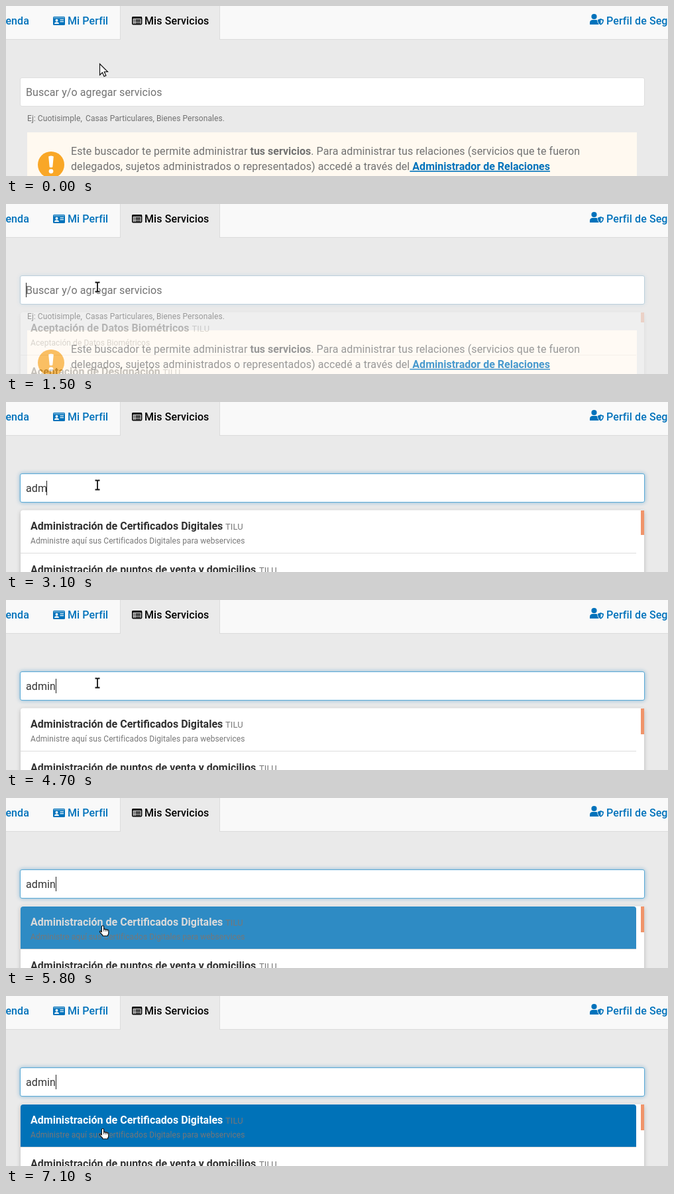
Recreate the animation shown at these times as an HTML page. Size 999 by 257 pixels, loop 8000 ms.

```html
<!DOCTYPE html>
<html lang="es">
<head>
<meta charset="utf-8">
<title>Mis Servicios</title>
<style>
html, body { margin: 0; width: 100%; height: 100%; overflow: hidden; background: #eaeaea; }
svg { display: block; font-family: Roboto, "Noto Sans", sans-serif; font-size: 16px; }
text { letter-spacing: .095px; }
.nav { font-weight: 500; fill: #0072bb; }
.blue { fill: #0072bb; }
.grey { fill: #717171; }
.small { font-size: 12px; letter-spacing: .07px; }
.org { font-size: 13px; fill: #777; }
.bold { font-weight: 700; letter-spacing: 0; }
.link { fill: #0072bb; text-decoration: underline; }
.typed { fill: #333; }
.glow { filter: drop-shadow(0 0 3px rgba(0,114,187,.45)); }
.panel { filter: drop-shadow(0 2px 3px rgba(0,0,0,.22)); }
</style>
</head>
<body>
<svg width="999" height="257" viewBox="0 0 999 257">
  <defs>
    <path id="bar-shape" d="M-3.5-7h2.5q1 0 1 1 0-1 1-1h2.5M0-6V6M-3.5 7h2.5q1 0 1-1 0 1 1 1h2.5"/>
  </defs>
  <rect width="999" height="257" fill="#eaeaea"/>
  <rect width="999" height="50" fill="#f9f9f9"/>
  <rect y="50" width="999" height="1" fill="#dcdcdc"/>
  <path d="M172 0h151v51H172z" fill="#dcdcdc"/>
  <path d="M173 0h149v51H173z" fill="#eaeaea"/>

  <g class="nav">
    <text x="35" y="28" text-anchor="end">enda</text>
    <text x="93" y="28">Mi Perfil</text>
    <text x="209" y="28" fill="#000">Mis Servicios</text>
    <text x="906" y="28">Perfil de Seguridad</text>
  </g>

  <!-- card icon -->
  <rect class="blue" x="71" y="16" width="18" height="13" rx="1.5"/>
  <g fill="#f9f9f9">
    <path d="M72 17.5h16v.8H72zM81.5 20.3h5.5v1.2h-5.5zM81.5 23h5.5v1.2h-5.5z"/>
    <circle cx="76.5" cy="21.8" r="2"/>
    <path d="M73 27q0-2.8 3.5-2.8t3.5 2.8z"/>
  </g>
  <!-- list icon -->
  <rect x="190.8" y="16.8" width="13.8" height="11" rx="1.2" fill="none" stroke="#000" stroke-width="1.6"/>
  <path d="M190.5 16.5h14.5v2.4h-14.5zM192.7 20.2h1.6v1.5h-1.6zM195.3 20.2h7.6v1.5h-7.6zM192.7 22.6h1.6v1.5h-1.6zM195.3 22.6h7.6v1.5h-7.6zM192.7 25h1.6v1.5h-1.6zM195.3 25h7.6v1.5h-7.6z"/>
  <!-- user icon -->
  <g class="blue">
    <circle cx="887.5" cy="16" r="4.1"/>
    <path d="M881 28v-2.5q0-4.5 4.5-4.5h5.5l1.2.4q0 4 2.6 6.6z"/>
    <path d="M897.5 19l4.5 1.7q.2 5.6-4.5 8-4.7-2.4-4.5-8z"/>
  </g>
  <path d="M897.5 20.9v6q2.9-1.7 2.9-5z" fill="#f9f9f9"/>

  <rect x="21.5" y="108.5" width="942" height="43" rx="2.5" fill="#fff" stroke="#dedede"/>
  <rect id="focus" class="glow" x="21.5" y="108.5" width="942" height="43" rx="2.5" fill="#fff" stroke="#5aaad6"/>
  <text id="hint" class="grey" x="30" y="136">Buscar y/o agregar servicios</text>
  <text id="typed" class="typed" x="30" y="136"></text>
  <rect id="caret" y="119" width="1" height="22" fill="#222"/>

  <text class="grey small" x="32" y="174">Ej: Cuotisimple, <tspan x="120">Casas Particulares, Bienes Personales.</tspan></text>
  <rect x="32" y="191" width="920" height="70" fill="#fff9f0"/>
  <circle cx="68" cy="240" r="20" fill="#f9a727"/>
  <path d="M64.2 227.5q3.8-2 7.6 0l-1.5 16q-2.3 1.6-4.6 0z" fill="#fff"/>
  <circle cx="68" cy="249.8" r="3.4" fill="#fff"/>
  <text class="grey" x="98" y="225">Este buscador te permite administrar <tspan class="bold">tus servicios</tspan>. Para administrar tus relaciones (servicios que te fueron</text>
  <text class="grey" x="98" y="248">delegados, sujetos administrados o representados) accedé a través del<tspan class="bold link"> Administrador de Relaciones</tspan></text>

  <g id="list">
    <rect class="panel" x="22" y="163.5" width="941" height="120" rx="4" fill="#fff"/>
    <path id="hover" d="M22 228V168q0-4 4-4h921q4 0 4 4v60z" fill="#0072b8"/>
    <rect x="22" y="228" width="929" height="1" fill="#dcdcdc"/>
    <rect id="bar" x="958" y="164" width="5" fill="#f0946a"/>
    <text id="t1" class="bold" x="37" y="193"></text>
    <text id="o1" class="org" y="193">TILU</text>
    <text id="sub" class="small" fill="#777" x="37" y="214"></text>
    <text id="t2" class="bold" x="37" y="259" fill="#333"></text>
    <text id="o2" class="org" y="259">TILU</text>
  </g>

  <g id="arrow" fill="#fff" stroke="#111" stroke-width="1.2">
    <path d="M.5.5v16.8l4-3.8 2.6 5.9 2.8-1.2-2.6-5.7h5.2z"/>
  </g>
  <g id="beam" fill="none">
    <use href="#bar-shape" stroke="#fff" stroke-width="3.6"/>
    <use href="#bar-shape" stroke="#111" stroke-width="1.8"/>
  </g>
  <g id="hand" fill="#fff" stroke="#111" stroke-width="1.2" stroke-linejoin="round">
    <path d="M-1.6 9.5V1.5Q-1.6 0 0 0T1.6 1.5V5.6q1.4-.9 2.6.2 1.6-.6 2.4.5 2.2-.3 2.2 1.6v3.6q0 1.6-1.2 2.6v1.4H-.2v-1.2q-1.8-1.6-4.4-5 .2-2.4 3 .2z"/>
    <path d="M1.6 5.6v3M4.2 5.8v3M6.6 6.3v2.5" stroke-width=".8"/>
  </g>
</svg>
<script>
const LOOP = 8000;
const $ = id => document.getElementById(id);

// Each table holds [time in ms, value]; a value lasts until the next row.
const pointer = [
  [0, ['arrow', 141, 87]], [200, ['arrow', 141, 89]], [300, ['arrow', 141, 94]],
  [400, ['arrow', 140, 101]], [500, ['beam', 138, 114]], [600, ['beam', 137, 123]],
  [700, ['beam', 138, 126.5]], [900, ['beam', 138, 125.5]],
  [5600, ['beam', 139, 131]], [5700, ['hand', 144, 175]], [5800, ['hand', 146, 193]],
  [5900, ['hand', 146, 199]], [6000, ['hand', 146, 200.5]]
];
const focus = [[0, 0], [1500, .25], [1600, .7], [1700, 1]];
const fade = [[0, 0], [1500, .28], [1600, .66], [1700, .93], [1800, .985], [2000, 1]];
const hover = [[0, 0], [5700, .25], [5800, .82], [5900, 1]];
const typed = [[0, ''], [2300, 'a'], [3100, 'adm'], [3200, 'admin']];
const caretX = { '': 30, a: 39, adm: 61, admin: 75 };
const caret = [[0, 0], [1500, 1], [3500, 0], [4700, 1], [5900, 0], [7100, 1]];
const bar = [[0, 15], [3100, 37], [3200, 39]];
const all = {
  t1: 'Aceptación de Datos Biométricos', o1: 280.5,
  sub: 'Aceptación de Datos Biométricos',
  t2: 'Aceptación de Designación', o2: 236.5
};
const found = {
  t1: 'Administración de Certificados Digitales', o1: 331,
  sub: 'Administre aquí sus Certificados Digitales para webservices',
  t2: 'Administración de puntos de venta y domicilios', o2: 382
};
const results = [[0, all], [3100, found]];

function at(table, t) {
  let value = table[0][1];
  for (const [start, v] of table) if (t >= start) value = v;
  return value;
}

function setText(id, text) {
  if ($(id).textContent !== text) $(id).textContent = text;
}

function draw(t) {
  const [shape, x, y] = at(pointer, t);
  for (const id of ['arrow', 'beam', 'hand']) {
    $(id).setAttribute('visibility', id === shape ? 'visible' : 'hidden');
  }
  $(shape).setAttribute('transform', `translate(${x} ${y})`);

  const word = at(typed, t);
  setText('typed', word);
  $('hint').style.opacity = word ? 0 : 1;
  $('caret').setAttribute('x', caretX[word]);
  $('caret').style.opacity = at(caret, t);
  $('focus').style.opacity = at(focus, t);

  const rows = at(results, t);
  for (const id of ['t1', 'sub', 't2']) setText(id, rows[id]);
  for (const id of ['o1', 'o2']) $(id).setAttribute('x', rows[id]);
  $('list').style.opacity = at(fade, t);
  $('bar').setAttribute('height', at(bar, t));

  const h = at(hover, t), c = Math.round(48 + 207 * h);
  $('hover').style.opacity = h;
  $('t1').setAttribute('fill', `rgb(${c},${c},${c})`);
}

const begin = performance.now();
function tick() {
  draw((performance.now() - begin) % LOOP);
  requestAnimationFrame(tick);
}
tick();
</script>
</body>
</html>
```
